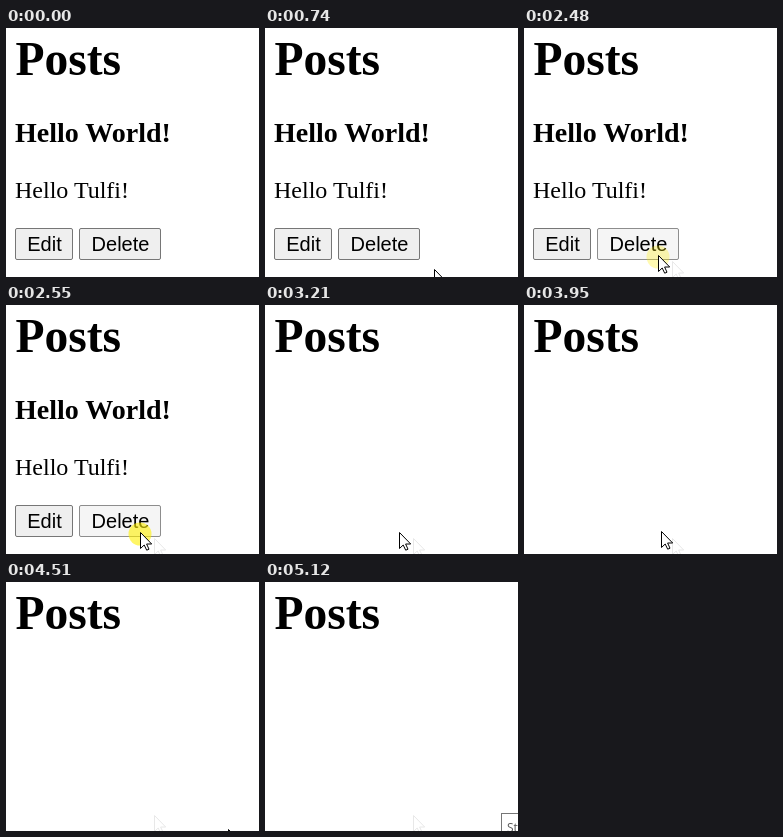
An HTML page that plays this animation: 253x249 px, repeating every 5.79 s.

```html
<!DOCTYPE html>
<html lang="en">
<head>
<meta charset="utf-8">
<title>Posts</title>
<style>
  html, body { margin: 0; width: 100%; height: 100%; overflow: hidden; background: #fff; }
  svg { display: block; width: 253px; height: 249px; }
  text { font-family: "Liberation Serif", serif; font-size: 24px; }
  .title { font-size: 47.5px; font-weight: bold; }
  .heading { font-size: 28px; font-weight: bold; }
  .button rect { fill: #efefef; stroke: #767676; }
  .button text { font: 20px "Liberation Sans", sans-serif; text-anchor: middle; }
  .button.hover rect { fill: #e5e5e5; stroke: #4f4f4f; }
  .button.active rect { fill: #f5f5f5; stroke: #8d8d8d; }
  #tooltip rect { fill: #fff; stroke: #767676; }
  #tooltip text { font: 12px "Open Sans", sans-serif; fill: #575757; }
</style>
</head>
<body>
<svg viewBox="0 0 253 249">
  <defs>
    <path id="arrow" d="M.5 .5V16.5L4.2 13L6.7 18.2L9 17.2L6.6 12H11.7Z"/>
  </defs>
  <text class="title" x="9.5" y="47">Posts</text>
  <g id="post">
    <text class="heading" x="9" y="114">Hello World!</text>
    <text x="9" y="170">Hello Tulfi!</text>
    <g class="button">
      <rect x="9.5" y="200.5" width="57" height="31" rx="1.5"/>
      <text x="38.5" y="223">Edit</text>
    </g>
    <g class="button" id="delete">
      <rect x="73.5" y="200.5" width="81" height="31" rx="1.5"/>
      <text x="114.5" y="223">Delete</text>
    </g>
    <circle id="click" cx="134" cy="229" r="11.5" fill="#fff000"/>
  </g>
  <use id="trail" href="#arrow" x="148" y="233" fill="none" stroke="#e8e8e8"/>
  <use id="cursor" href="#arrow" fill="#fff" stroke="#000"/>
  <g id="tooltip">
    <rect x="236.5" y="231.5" width="60" height="30"/>
    <text x="242" y="250">Stop</text>
  </g>
</svg>
<script>
const LOOP = 5790, STEP = 70;
const ENTER = 600, HOVER = 1020, CLICK = 2480, REMOVE = 3210, LEAVE = 3950, GONE = 4580, TIP = 5050;

// Pointer positions, one per step; the last one is held.
const enterPath = [[243, 236], [204, 243], [169, 241], [158, 237], [151, 234], [148, 233], [139, 229], [134, 227]];
const leavePath = [[137, 226], [151, 225], [173, 226], [195, 229], [206, 232], [211, 235], [214, 239], [218, 243], [222, 247]];

const el = id => document.getElementById(id);
const show = (id, opacity) => el(id).setAttribute("opacity", Number(opacity));
const along = (path, elapsed) => path[Math.min(path.length - 1, Math.floor(elapsed / STEP))];
const fadeIn = (t, start, full) => t < start ? 0 : t < start + STEP ? full / 2 : full;

function draw(t) {
  const visible = t >= ENTER && t < GONE;
  show("cursor", visible);
  if (visible) {
    const [x, y] = t < LEAVE ? along(enterPath, t - ENTER) : along(leavePath, t - LEAVE);
    el("cursor").setAttribute("transform", `translate(${x} ${y})`);
  }
  show("trail", t >= HOVER);
  show("post", t < REMOVE);
  show("click", fadeIn(t, CLICK, 0.6));
  show("tooltip", fadeIn(t, TIP, 1));
  el("delete").setAttribute("class", "button" + (t >= CLICK ? " active" : t >= HOVER ? " hover" : ""));
}

const start = performance.now();
function tick() {
  draw((performance.now() - start) % LOOP);
  requestAnimationFrame(tick);
}
tick();
</script>
</body>
</html>
```
